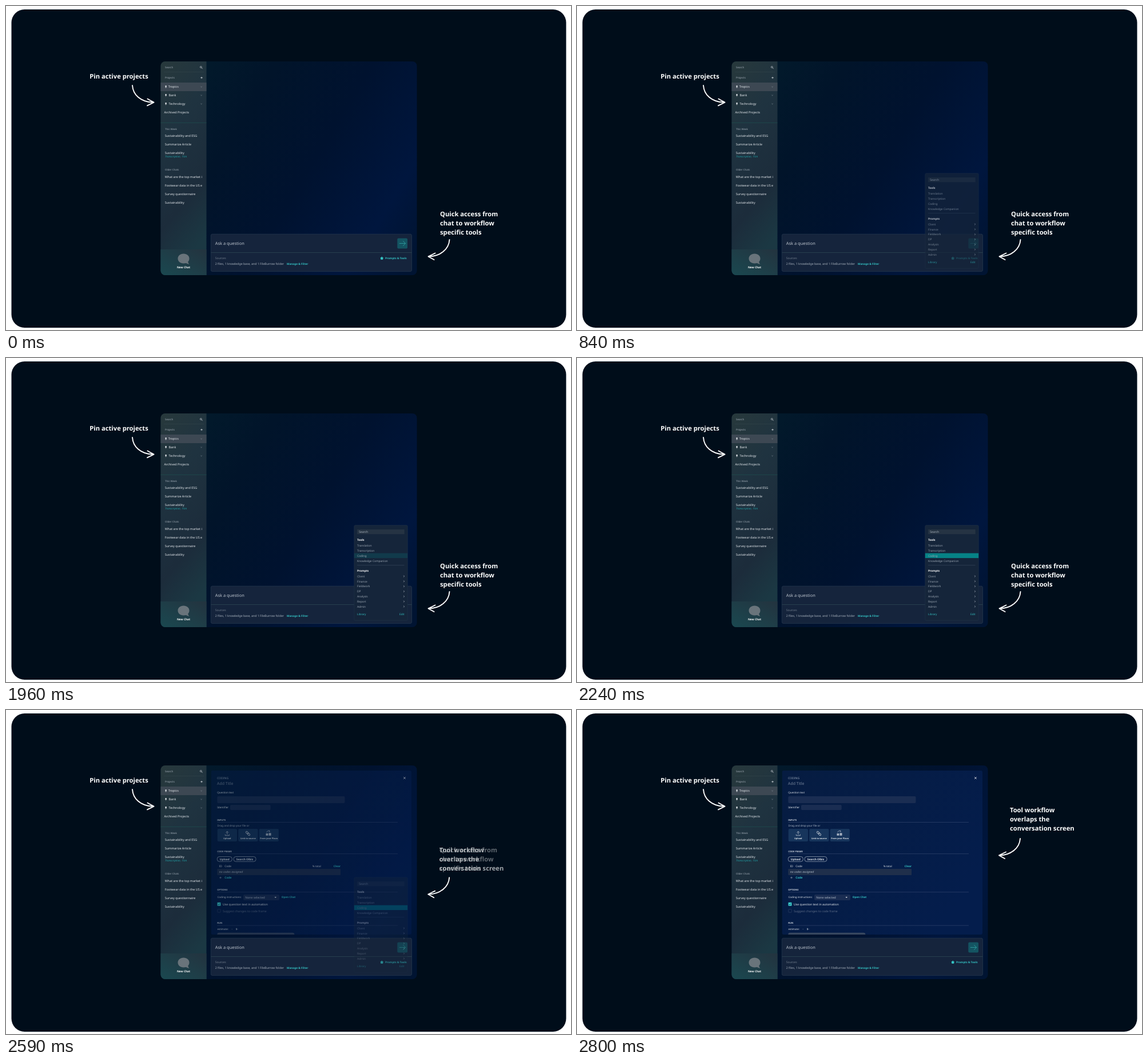
Recreate the animation shown at these times as an HTML page. Size 988x567 px, loop 4900 ms.

```html
<!DOCTYPE html>
<html lang="en">
<head>
<meta charset="utf-8">
<title>Chat workspace</title>
<style>
html, body { margin: 0; width: 100%; height: 100%; overflow: hidden; background: #fff; }
svg { display: block; width: 100vw; height: 100vh; }
text { font-family: "Noto Sans", sans-serif; text-rendering: geometricPrecision; white-space: pre; }
</style>
</head>
<body>
<svg id="stage" viewBox="0 0 988 567">
  <defs>
    <linearGradient id="main" gradientUnits="userSpaceOnUse" x1="330" y1="150" x2="740" y2="400">
      <stop offset="0" stop-color="#02192b"/>
      <stop offset=".2" stop-color="#01142a"/>
      <stop offset=".5" stop-color="#00122f"/>
      <stop offset=".82" stop-color="#00163e"/>
      <stop offset="1" stop-color="#001432"/>
    </linearGradient>
    <linearGradient id="side" x1="0" y1="0" x2=".25" y2="1">
      <stop offset="0" stop-color="#28393c"/>
      <stop offset=".35" stop-color="#1f3340"/>
      <stop offset=".75" stop-color="#1c2c3b"/>
      <stop offset="1" stop-color="#1b3843"/>
    </linearGradient>
    <linearGradient id="foot" x1="1" y1="0" x2="0" y2="1">
      <stop offset="0" stop-color="#23333f"/>
      <stop offset="1" stop-color="#1a4850"/>
    </linearGradient>
    <linearGradient id="sheet" x1="0" y1="0" x2="1" y2=".6">
      <stop offset="0" stop-color="#061c41"/>
      <stop offset="1" stop-color="#041d4c"/>
    </linearGradient>
    <clipPath id="appClip"><rect x="270.5" y="97" width="448" height="374" rx="8"/></clipPath>
    <clipPath id="sheetClip"><rect x="358.5" y="106" width="350.5" height="287" rx="3"/></clipPath>
  </defs>
  <rect width="988" height="567" fill="#fff"/>
  <rect x="9.5" y="6" width="970" height="557" rx="23" fill="#000d1a"/>
  <g clip-path="url(#appClip)">
    <rect x="270" y="97" width="449" height="374" fill="url(#main)"/>
    <g id="sidebar"></g>
    <g id="ask"></g>
    <g id="tool" clip-path="url(#sheetClip)"></g>
    <g id="menu"></g>
  </g>
  <g id="notes"></g>
</svg>
<script>
const $ = id => document.getElementById(id);
const TEAL = '#35c3c4', WHITE = '#e4e8ec', GREY = '#a3adb8';

// y is the middle of the capitals
const text = (x, y, str, size, fill = WHITE, attrs = '') =>
  `<text x="${x}" y="${(y + size * 0.357).toFixed(2)}" font-size="${size}" fill="${fill}" ${attrs}>${str.replace(/&/g, '&amp;')}</text>`;
const bold = (x, y, str, size, fill = WHITE, attrs = '') => text(x, y, str, size, fill, 'font-weight="700" ' + attrs);
const rect = (x, y, w, h, fill, rx = 0, attrs = '') =>
  `<rect x="${x}" y="${y}" width="${w}" height="${h}" rx="${rx}" fill="${fill}" ${attrs}/>`;
const path = (d, stroke, w = 0.7, attrs = '') =>
  `<path d="${d}" fill="none" stroke="${stroke}" stroke-width="${w}" ${attrs}/>`;
const hline = (x1, x2, y, stroke, w = 0.6) => path(`M${x1} ${y}H${x2}`, stroke, w);
const plus = (x, y, r, stroke) => path(`M${x - r} ${y}h${2 * r}M${x} ${y - r}v${2 * r}`, stroke, 0.7);
const MID = 'text-anchor="middle"';

function sidebar() {
  const pin = y => `<path d="M278.4 ${y - 2.2}h2.4l-.4 2 .9 1h-3.4l.9-1z" fill="${WHITE}"/>` + path(`M279.6 ${y + 0.6}v1.8`, WHITE, 0.5);
  const caret = y => path(`M340.5 ${y - 0.5}l1.1 1 1.1-1`, GREY, 0.6);
  const pinned = [['Tropics', 283.7, 141.5], ['Bank', 284.5, 156.3], ['Technology', 284.5, 171.3]];
  const chats = [
    ['Sustainability and ESG', 227.3], ['Summarize Article', 242.3], ['Sustainability', 257.3],
    ['What are the top market i', 299.3], ['Footwear data in the US e', 314.3],
    ['Survey questionnaire', 329.3], ['Sustainability', 344]
  ];
  return rect(270, 97, 80.5, 374, 'url(#side)') +
    rect(270, 426, 80.5, 45, 'url(#foot)') +
    rect(270, 134, 80.5, 15, '#3d4853') +
    hline(276, 346, 115.5, '#34474d', 0.5) + hline(270, 350.5, 204.3, '#1f5753') +
    text(278, 107.5, 'Search', 4.5, GREY) +
    `<circle cx="340.8" cy="106.9" r="1.4" fill="none" stroke="${WHITE}" stroke-width=".6"/>` +
    path('M341.8 107.9l1.8 1.8', WHITE, 0.7) +
    text(278, 125.5, 'Projects', 4.5, GREY) + plus(342, 125.5, 1.7, WHITE) +
    pinned.map(([s, x, y]) => pin(y) + text(x, y, s, 5.42) + caret(y)).join('') +
    text(276.5, 186.3, 'Archived Projects', 5.42) +
    text(278, 215, 'This Week', 4.4, GREY) + text(278, 286.5, 'Older Chats', 4.4, GREY) +
    chats.map(([s, y]) => text(277.8, y, s, 5.42)).join('') +
    text(278, 263, 'Transcription, 15m', 4.6, '#21a3a8', 'font-style="italic"') +
    `<path d="M310.5 433.5c6 0 10 3.6 10 8.4 0 2.6-1 4.4-2.4 5.8l1.8 4.3-5.2-2c-1.3.3-2.7.5-4.2.5-6 0-10-3.700-10-8.500s4-8.500 10-8.500z" fill="#69747b"/>` +
    bold(310.5, 457.3, 'New Chat', 4.8, '#fff', MID);
}

function ask() {
  return rect(358.3, 399.2, 351.2, 65.3, '#15243c', 2.5, 'stroke="#273a50" stroke-width=".7"') +
    hline(358.5, 709.500, 431.5, '#2c4652', 0.8) +
    text(365.8, 415.5, 'Ask a question', 7.45, '#bcc4cd') +
    rect(684.3, 406.5, 17.7, 18, '#145462', 2) +
    path('M687.8 415.500h10.800M694.300 411.200l4.300 4.300-4.300 4.300', '#2e9c9f', 0.9) +
    text(365.8, 441, 'Sources', 5.1, '#737f8d') +
    text(365.8, 451.3, '2 files, 1 knowledge base, and 1 FileBurrow folder', 5.18, '#a9b3be') +
    bold(491, 451.3, 'Manage & Filter', 4.72, TEAL) +
    `<path d="M657.200 438.200l1.100 1.800h1.400l-.6 3.800h-3.800l-.6-3.800h1.400z" fill="${TEAL}"/>` +
    bold(663, 441.4, 'Prompts & Tools', 4.68, TEAL);
}

function tool() {
  const field = '#1a2d52', dim = '#5c6b86';
  const section = (y, s) => text(369.3, y, s, 4, '#ccd3dd', 'font-weight="600"') + hline(369.3, 685, y + 4.1, '#40527a', 0.5);
  const tile = (x, s) => rect(x, 208, 34.3, 22, '#17355c', 2) + bold(x + 17.1, 224.7, s, 3.8, WHITE, MID);
  const pill = (x, w, s) => rect(x, 256.6, w, 8.6, 'none', 3.8, 'stroke="#c8d0da" stroke-width=".6"') + bold(x + w / 2, 261, s, 4.78, WHITE, MID);
  const icon = '#a6b1c0';
  return rect(358.5, 106, 350.5, 287, 'url(#sheet)') +
    text(369, 119, 'CODING', 5.1, '#9aa7ba') + text(369, 129, 'Add Title', 6.9, '#75839a') +
    path('M695.100 117.200l3.600 3.600m0-3.600l-3.600 3.600', '#fff', 0.8) +
    text(369.3, 144.5, 'Question text', 4.56) + rect(369.300, 151, 223.200, 12, field, 2) +
    text(369.3, 170.3, 'Identifier', 4.6) + rect(392, 166, 70.700, 9, field, 2) +
    section(192.4, 'INPUTS') +
    text(369.6, 202.5, 'Drag and drop your file or', 4.57, '#b3bdca') +
    tile(369.700, 'Upload') + tile(406.200, 'Link to source') + tile(442.600, 'From your Plavo') +
    path('M386.800 218v-5.500m-2.300 2.200l2.300-2.300 2.300 2.300M383.300 217.500v2.200h7v-2.200', icon, 0.9) +
    `<g transform="rotate(45 423 216)" fill="none" stroke="${icon}" stroke-width="1"><rect x="418.500" y="214.500" width="5" height="3" rx="1.500"/><rect x="422.500" y="214.500" width="5" height="3" rx="1.500"/></g>` +
    rect(454.500, 216, 3.800, 3.800, icon, 0.5) + rect(459.500, 215.300, 4, 4.500, icon, 0.5) +
    path('M456 214.500c0-3 3-3.500 5-2.500m-1.300-1.300l1.800 1.500-1.800 1.300', icon, 0.8) +
    section(247.5, 'CODE FRAME') +
    pill(369.300, 26, 'Upload') + pill(398, 39, 'Search Olbis') +
    text(372.6, 273, 'ID', 4.8) + text(382.3, 273, 'Code', 4.8) + text(535.8, 273, '% total', 4.6) +
    bold(572.8, 273, 'Clear', 4.7, TEAL) +
    rect(369.300, 278, 215.700, 11, '#1f2f4b', 1) +
    text(372.8, 283.4, 'no codes assigned', 5.1, '#b3bdca', 'font-style="italic"') +
    plus(375, 293.4, 1.8, '#8d9aae') + bold(382.3, 293, 'Code', 4.9, TEAL) +
    section(314.6, 'OPTIONS') +
    text(369.4, 327.8, 'Coding instructions:', 4.5) + rect(415, 323, 63, 10, field, 2) +
    text(418.3, 328, 'None selected', 5.15, '#b3bdca') +
    `<path d="M469.500 327h3.400l-1.700 1.900z" fill="${WHITE}"/>` +
    bold(481.8, 327.8, 'Open Chat', 4.65, TEAL) +
    rect(369.500, 336.800, 6, 6, '#3cc9ca', 0.7) + path('M370.800 339.900l1.200 1.200 2.200-2.500', '#0a2548', 0.7) +
    text(379, 340.2, 'Use question text in automation', 5.23) +
    rect(369.800, 348.700, 5.500, 5.500, 'none', 0.7, `stroke="#34476a" stroke-width=".6"`) +
    text(379, 352, 'Suggest changes to code frame', 5.2, dim) +
    section(373, 'RUN') +
    text(369.4, 383.6, 'estimate:', 4.5) + text(394.5, 383.6, '-', 4.5) + text(401.800, 383.6, '$-', 4.6) +
    rect(369.300, 389.700, 135, 9, '#38475f', 3);
}

function menu() {
  const soft = '#9ba6b2';
  const tools = [['Translation', 328], ['Transcription', 337], ['Coding', 346], ['Knowledge Companion', 354.8]];
  const prompts = ['Client', 'Finance', 'Fieldwork', 'DP', 'Analysis', 'Report', 'Admin'];
  return rect(608.800, 292.800, 93.400, 166.500, '#15253a', 2, 'stroke="#22344a" stroke-width=".6"') +
    rect(614, 300, 82.700, 8.300, '#253343', 0.5) + text(617, 304, 'Search', 5.1, '#a9b3be') +
    bold(614, 318.2, 'Tools', 4.9, '#fff') +
    rect(608.800, 341.600, 93.400, 8.500, '#078488', 0, 'id="hover"') +
    tools.map(([s, y]) => text(614, y, s, 4.92, soft)).join('') +
    hline(614, 696.5, 362.6, '#3a4b5e') +
    bold(614, 372, 'Prompts', 4.75, '#fff') +
    prompts.map((s, i) => {
      const y = 382 + i * 8.82;
      return text(614, y, s, 4.92, soft) + path(`M695.200 ${y - 1.4}l1.400 1.400-1.400 1.400`, '#c5ccd4', 0.7);
    }).join('') +
    text(614, 448.8, 'Library', 4.7, TEAL) + text(696.500, 448.8, 'Edit', 4.7, TEAL, 'text-anchor="end"');
}

function notes() {
  const label = (x, y, s) => text(x, y, s, 11.2, '#fff', 'font-weight="600"');
  const lines = (id, list) => `<g id="${id}">` + list.map((s, i) => label(759, 364.3 + i * 16, s)).join('') + '</g>';
  const arrow = d => path(d, '#fff', 1.9, 'stroke-linecap="round" stroke-linejoin="round"');
  return label(146.3, 122.5, 'Pin active projects') +
    arrow('M221 139C222 155 235 168 257 168.700M247.500 162.500L258.500 168.700L247 174.300') +
    '<g id="words">' + lines('before', ['Quick access from', 'chat to workflow', 'specific tools']) +
    lines('after', ['Tool workflow', 'overlaps the', 'conversation screen']) + '</g>' +
    '<g id="pointer">' + arrow('M775.500 409C774.500 425 760 438 739.500 438.300M750.500 432.500L738.500 438.300L748.500 444') + '</g>';
}

Object.entries({ sidebar, ask, tool, menu, notes }).forEach(([id, draw]) => { $(id).innerHTML = draw(); });

const LOOP = 4900, TICK = 70;

// ease-out, cubic-bezier(0, 0, .58, 1)
function easeOut(x) {
  if (x <= 0) return 0;
  if (x >= 1) return 1;
  let lo = 0, hi = 1;
  for (let i = 0; i < 24; i++) {
    const s = (lo + hi) / 2;
    if (1.74 * s * s - 0.74 * s ** 3 < x) lo = s; else hi = s;
  }
  return 3 * lo * lo - 2 * lo ** 3;
}

// progress held for one tick at a time
function stepped(t, start, rate, lag) {
  return t < start ? 0 : easeOut(rate * (Math.floor((t - start) / TICK) + 1) - lag);
}

function render(t) {
  const open = stepped(t, 700, 0.2, 0.07);
  const hover = stepped(t, 1960, 0.2, 0.06);
  const swap = stepped(t, 2520, 0.25, 0.05);
  const fade = (id, v) => $(id).setAttribute('opacity', v.toFixed(3));
  fade('menu', open * (1 - swap));
  fade('hover', hover);
  fade('tool', swap);
  fade('before', 1 - swap);
  fade('after', swap);
  $('words').setAttribute('transform', `translate(${-2 * swap} ${-188.8 * swap})`);
  $('pointer').setAttribute('transform', `translate(${-0.5 * swap} ${-184 * swap})`);
}

const begin = performance.now();
function frame() {
  render((performance.now() - begin) % LOOP);
  requestAnimationFrame(frame);
}
frame();
</script>
</body>
</html>
```
